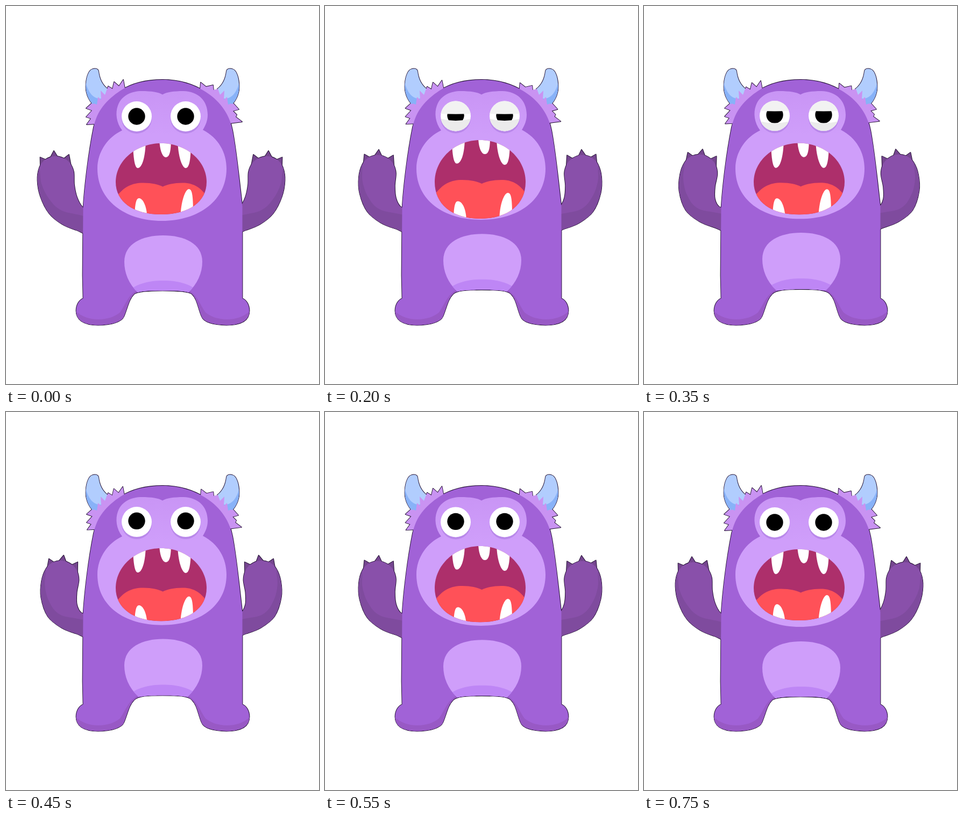
Write an HTML page with a canvas that moves like this. It is 582x702 px and loops after 0.8 s.

```html
<!DOCTYPE html>
<html lang="en">
<head>
<meta charset="utf-8">
<title>Shouting monster</title>
<style>
html, body { margin: 0; width: 100%; height: 100%; overflow: hidden; background: #fff; }
canvas { display: block; width: 582px; height: 702px; }
</style>
</head>
<body>
<canvas id="stage" width="582" height="702"></canvas>
<script>
const ctx = document.getElementById('stage').getContext('2d');
const STEP = 50, STEPS = 16, CYCLE = 15;
const LINE = '#1c0a2c', FUR = '#a162d7', FUR_DARK = '#9859c5', FACE = '#cf9efa', TUFT = '#c993f2';
const BLINK = [0, 0.04, 0.33, 0.58, 0.8, 1, 0.85, 0.62, 0.25];
let lining = false;

const clamp = v => Math.max(0, Math.min(1, v));
const wave = (i, n) => (1 - Math.cos(2 * Math.PI * n * i / CYCLE)) / 2;
const toPath = p => typeof p === 'string' ? new Path2D(p) : p;

// Outlines go down in a first pass, so that only the silhouette keeps its line
function paint(p, color, outlined) {
  if (!lining) {
    ctx.fillStyle = color;
    ctx.fill(toPath(p));
  } else if (outlined) {
    ctx.strokeStyle = LINE;
    ctx.lineWidth = 1.8;
    ctx.lineJoin = 'round';
    ctx.stroke(toPath(p));
  }
}

function inside(p, draw) {
  ctx.save();
  ctx.clip(toPath(p));
  draw();
  ctx.restore();
}

function mirrored(sum, draw) {
  ctx.save();
  ctx.transform(-1, 0, 0, 1, sum, 0);
  draw();
  ctx.restore();
}

function disc(x, y, r, color) {
  ctx.fillStyle = color;
  ctx.beginPath();
  ctx.arc(x, y, r, 0, 7);
  ctx.fill();
}

// Closed Catmull-Rom curve through the points
function smooth(pts) {
  const path = new Path2D(), n = pts.length, at = i => pts[(i + n) % n];
  path.moveTo(...pts[0]);
  for (let i = 0; i < n; i++) {
    const [a, b, c, d] = [at(i - 1), at(i), at(i + 1), at(i + 2)];
    path.bezierCurveTo(b[0] + (c[0] - a[0]) / 6, b[1] + (c[1] - a[1]) / 6,
      c[0] - (d[0] - b[0]) / 6, c[1] - (d[1] - b[1]) / 6, c[0], c[1]);
  }
  return path;
}

const ARM = [[158, 423], [130, 416], [104, 405], [80, 385], [64, 354], [58.5, 324], [62, 300], [72, 286],
  [90, 279], [108, 283], [119, 292], [126, 308], [127, 332], [132, 355], [142, 373], [158, 382]];
const ARM_SHADE = [[45, 290], [61, 298], [66, 330], [80, 358], [104, 380], [158, 397], [158, 440], [80, 440], [35, 380]];
const CLAWS = [[[64, 300], [63.5, 281], [78, 287]], [[80, 286], [89, 269], [99, 285]], [[104, 286], [117, 276], [121, 297]]];

// The hand swings around the elbow while the shoulder stays put
function bend([x, y], p) {
  const w = clamp(Math.min((410 - y) / 60, (153 - x) / 25));
  const a = 0.227 * w * p, c = Math.cos(a), s = Math.sin(a), dx = x - 112, dy = y - 356;
  return [112 + dx * c - dy * s, 356 + dx * s + dy * c - 5 * p * (1 - w)];
}

function arm(p) {
  const pose = pts => pts.map(q => bend(q, p));
  for (const claw of CLAWS) {
    const [a, b, c] = pose(claw);
    const side = q => [0, 1].map(k => q[k] * 0.4 + b[k] * 0.6);
    paint(`M${a} Q${side(a)} ${b} Q${side(c)} ${c}Z`, '#75468f', true);
  }
  const shape = smooth(pose(ARM));
  paint(shape, '#8950aa', true);
  inside(shape, () => paint(smooth(pose(ARM_SHADE)), '#7f4b9e'));
}

const HORN = 'M168 188C156 180 148.5 165 148.5 150C148.5 135 153 120 160 117.5C165 115.5 171 116 172 121C174 137 180 147 189 154L186 172Z';
const TUFT_L = 'M226 166L221 153L218 137L210 149L201 141L198 154L190 149L186 160L160 180L149 190L160 194L149 206L158 209L150 220L167 219L190 200Z';
const TUFT_R = 'M354 166L361 154L362 142L372 150L385 147L386 157L393 158L424 182L433 192L422 195L429 202L427 206L439 215L416 218L395 200Z';

function tuft(shape, x, p) {
  ctx.save();
  ctx.translate(x, 185);
  ctx.scale(1 - 0.03 * p, 1 - 0.04 * p);
  ctx.translate(-x, -185);
  paint(shape, TUFT, true);
  ctx.restore();
}

function horn() {
  paint(HORN, '#b1cdfe', true);
  inside(HORN, () => paint('M146 132C151 158 160 172 176 172L190 164L186 200L140 190Z', '#88b2f8'));
  paint('M157 188L163 181L169 183L171 169L177 174L176 157L184 165L188 154L205 158L195 190L168 197Z', TUFT);
}

function body(p) {
  const y = 528.5 - 2.5 * p;
  const shape = new Path2D(`M291 137C325 137 352 147 372 160C400 178 416 203 421 230
    C428 265 434 325 439.5 372L439.5 543C447 546 452.5 555 452.5 566C452.5 582 440 592.5 410 592.5
    C386 592 368 587 364 577C357 561 356 545 346 535C340 ${y + 1} 320 ${y} 291 ${y}
    C264 ${y} 245 ${y + 1} 238 535C228 545 226 561 219 577C215 586 197 592.5 171 592.5
    C143 592.5 130.5 582 130.5 566C130.5 555 136 546 143.5 543L142.5 500L143.5 375C146 335 153 275 163 225
    C169 195 186 175 213 157C235 143 262 137 291 137Z`);
  paint(shape, FUR, true);
  inside(shape, () => {
    const foot = () => paint('M124 560C143 587 190 588 212 569C221 557 227 536 245 527L250 600L124 600Z', FUR_DARK);
    foot();
    mirrored(583, foot);
    const b = 426 - 5 * p;
    const belly = `M246 ${b + 107}C228 ${b + 90} 220 ${b + 70} 220 ${b + 49}C220 ${b + 15} 254 ${b} 292 ${b}
      C331 ${b} 365 ${b + 15} 365 ${b + 49}C365 ${b + 70} 356 ${b + 90} 338 ${b + 107}Z`;
    paint(belly, FACE);
    inside(belly, () => {
      const s = 510 - 4 * p;
      paint(`M222 ${s + 22}C245 ${s + 5} 265 ${s} 292 ${s}C320 ${s} 340 ${s + 5} 362 ${s + 22}L362 560L222 560Z`, '#be86f5');
    });
  });
}

function face(p) {
  const low = 399 - 3.7 * p;
  const fill = ctx.createLinearGradient(0, 160, 0, 240);
  fill.addColorStop(0, '#c995f5');
  fill.addColorStop(1, FACE);
  paint(`M216 231C205 217 203 198 208 185C215 165 235 158 252 158C270 158 284 160 291 164.5
    C298 160 312 158 330 158C357 159 375 175 375 202C375 213 371 222 366 230
    C395 245 410 272 410 302C410 360 360 ${low} 290 ${low}C220 ${low} 170 360 170 302C170 270 190 243 216 231Z`, fill);
}

function eye(x, p, k) {
  const y = 205 - p;
  disc(x, y + 4, 28, '#b988ea');
  disc(x, y, 28, '#fff');
  ctx.save();
  ctx.beginPath();
  ctx.arc(x, y, 28, 0, 7);
  ctx.clip();
  disc(x, 205 - 3 * p, 15.7, '#000');
  if (k > 0) {
    const top = 177 + 29 * k, low = 233 - 25 * k;
    paint(`M${x - 30} 170L${x + 30} 170L${x + 30} ${top}Q${x} ${top + 1} ${x - 30} ${top}Z`, '#f2f2f2');
    paint(`M${x - 30} 240L${x + 30} 240L${x + 30} ${low - 4}Q${x} ${low + 4} ${x - 30} ${low - 4}Z`, '#ebebeb');
  }
  ctx.restore();
}

function mouth(q, drop) {
  const top = 255 - 6 * q, low = 387 + drop * q;
  const up = 327 - (327 - top) * 0.55, down = 327 + (low - 327) * 0.6;
  const shape = new Path2D(`M204 327C204 ${up} 242 ${top} 288.5 ${top}C335 ${top} 373 ${up} 373 327
    C373 ${down} 341 ${low} 288.5 ${low}C236 ${low} 204 ${down} 204 327Z`);
  paint(shape, '#ad2f6b');
  inside(shape, () => {
    const t = 328.5 - 5.5 * q;
    paint(`M200 ${t + 34}C215 ${t + 9} 232 ${t} 255 ${t}C272 ${t} 283 ${t + 3} 291.5 ${t + 7}
      C300 ${t + 3} 312 ${t} 328 ${t}C350 ${t} 364 ${t + 9} 378 ${t + 32}L378 410L200 410Z`, '#ff5158');
    // Each tooth: left, right, tip x, tip y, root y
    const tooth = (l, r, x, tip, root) => paint(
      `M${l} ${root}C${l} ${root + (tip - root) * 0.65} ${x - 6} ${tip} ${x} ${tip}
       C${x + 8} ${tip} ${r} ${root + (tip - root) * 0.65} ${r} ${root}Z`, '#fff');
    tooth(236, 260, 245, 301 - 8.5 * q, 242);
    tooth(285, 307, 297, 281 - 6 * q, 242);
    tooth(319, 344, 334, 301 - 6 * q, 242);
    tooth(239, 263, 247, 357 + 5.5 * q, 402);
    tooth(324, 348, 340, 340 + 7 * q, 402);
  });
}

function figure(p) {
  arm(p);
  mirrored(577, () => arm(p));
  tuft(TUFT_L, 185, p);
  tuft(TUFT_R, 398, p);
  horn();
  mirrored(582, horn);
  body(p);
}

function draw(i) {
  const p = wave(i, 1), q = wave(i, 2), k = BLINK[i] || 0;
  ctx.fillStyle = '#fff';
  ctx.fillRect(0, 0, 582, 702);
  lining = true;
  figure(p);
  lining = false;
  figure(p);
  face(p);
  eye(243, p, k);
  eye(334, p, k);
  mouth(q, i < CYCLE / 2 ? 8 : 3.4);
}

const start = performance.now();
let shown = -1;
function tick() {
  const i = Math.floor(Math.max(0, performance.now() - start) / STEP) % STEPS;
  if (i !== shown) draw(shown = i);
  requestAnimationFrame(tick);
}
tick();
</script>
</body>
</html>
```
